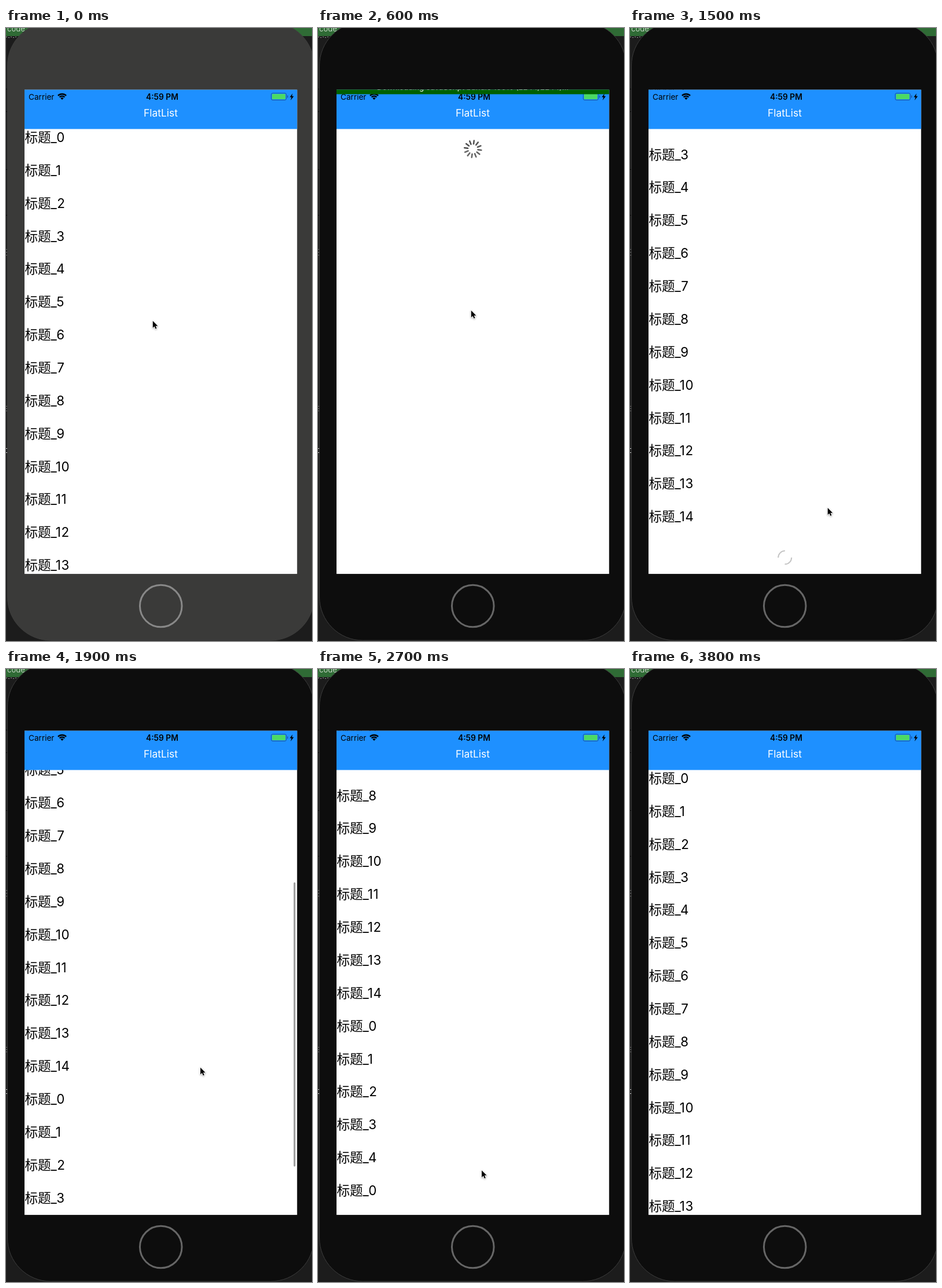
Animation of 529 by 1059 pixels, one loop 4000 ms. Source, as an HTML page with a canvas:

```html
<!DOCTYPE html>
<html lang="zh-CN">
<head>
<meta charset="utf-8">
<style>
html, body { margin: 0; width: 100%; height: 100%; overflow: hidden; background: #1c1c1c; }
canvas { display: block; }
</style>
</head>
<body>
<canvas id="stage" width="529" height="1059"></canvas>
<script>
const g = document.getElementById('stage').getContext('2d');
const FONT = 'Inter, "Noto Sans CJK SC", "Noto Sans CJK", sans-serif';
const LEFT = 32, WIDTH = 471.5, MID = LEFT + WIDTH / 2;
const TOP = 106.4, LIST = 174.5, BOTTOM = 943.3, VIEW = BOTTOM - LIST;
const ROW = 56.86, PAGE = 15, MORE = 5;
const LOOP = 4000, STEP = 100;

const clamp = u => Math.max(0, Math.min(1, u));
const mix = (a, b, u) => a + (b - a) * u;
const progress = (t, from, to) => clamp((t - from) / (to - from));
const ease = (t, from, to) => 1 - (1 - progress(t, from, to)) ** 2;
const rad = degrees => degrees * Math.PI / 180;

// Pointer stops: time and tip position
const STOPS = [
  [300, 253, 505], [600, 264, 487], [1000, 254, 680], [1500, 341, 828],
  [2200, 331, 582], [3000, 253, 1035], [3300, 325, 902], [3800, -20, -80]
];

function pointerAt(t) {
  const i = Math.max(1, STOPS.findIndex(s => s[0] >= t));
  const [a, b] = t > 3800 ? STOPS.slice(-2) : [STOPS[i - 1], STOPS[i]];
  const u = progress(t, a[0], b[0]);
  return [mix(a[1], b[1], u), mix(a[2], b[2], u)];
}

const rowsAt = t => PAGE + (t >= 1800) * MORE + (t >= 2500) * MORE;
const bottomOf = rows => (rows + 1) * ROW - VIEW;

// Two pulls to the end of the list, then a flick to the top with a small bounce
function offsetAt(t) {
  const first = bottomOf(PAGE), second = bottomOf(PAGE + MORE);
  const down = first * ease(t, 1200, 1400) + (second - first) * ease(t, 1800, 2100);
  const bounce = 7 * Math.sin(Math.PI * progress(t, 2800, 3200));
  return down - second * ease(t, 2700, 3000) - bounce;
}

function box(x, y, w, h, color) {
  g.fillStyle = color;
  g.fillRect(x, y, w, h);
}

function pill(x, y, w, h, r, fill, line) {
  g.beginPath();
  g.roundRect(x, y, w, h, r);
  if (fill) {
    g.fillStyle = fill;
    g.fill();
  }
  if (line) {
    g.strokeStyle = line;
    g.lineWidth = 1;
    g.stroke();
  }
}

function text(s, x, y, size, color, align = 'left', weight = 400) {
  g.font = `${weight} ${size}px ${FONT}`;
  g.fillStyle = color;
  g.textAlign = align;
  g.fillText(s, x, y);
}

function arc(x, y, r, mid, half, color, width) {
  g.beginPath();
  g.arc(x, y, r, rad(mid - half), rad(mid + half));
  g.strokeStyle = color;
  g.lineWidth = width;
  g.stroke();
}

function drawDesk() {
  box(0, 0, 529, 1059, '#1c1c1c');
  box(0, 0, 529, 14, '#2f6b35');
  text('code', 2, 6, 13, '#c4d4c4');
  for (let x = 0; x < 18; x += 4) box(x, 15 + x / 4 % 2, 2, 1, '#999');
  for (const y of [105, 144, 244, 323]) box(0, y, 4, 1, '#000');
  for (const y of [382, 387, 392, 653, 657, 661]) box(0, y, 3, 1, '#666');
  for (const y of [726, 733]) box(0, y, 3, 1, '#ccc');
}

function drawPhone(lit) {
  pill(2.5, -10, 530, 1068, 75, lit ? '#3a3a39' : '#0d0d0d', lit ? '#3f3f3e' : '#3c3c3c');
  arc(MID, 998.5, 36.3, 0, 180, lit ? '#888' : '#666', 3);
}

function drawSpokes(t) {
  for (let i = 0; i < 12; i++) {
    g.save();
    g.translate(MID, 209);
    g.rotate(rad(i * 30 + 8));
    const shade = 75 + (i - t / STEP + 120) % 12 * 3;
    pill(7.5, -1.3, 8.5, 2.6, 1.3, `rgb(${shade},${shade},${shade})`);
    g.restore();
  }
}

function drawLoader(y, t) {
  const turn = 45 + (t - 1500) * 0.15;
  for (const a of [turn, turn + 180]) arc(MID, y, 11.5, a, 46, '#c4c4c4', 2);
}

function drawScrollbar(rows, offset) {
  const track = VIEW - 6, size = track * VIEW / ((rows + 1) * ROW);
  const y = LIST + 3 + Math.max(0, offset) / bottomOf(rows) * (track - size);
  pill(497.3, y, 3, size + Math.min(0, offset), 1.5, '#999');
}

function drawList(t) {
  const rows = rowsAt(t), offset = offsetAt(t);
  for (let i = 0; i < rows; i++) {
    const y = LIST + i * ROW - offset + 22.5;
    text('标题', 32.5, y, 22.6, '#000');
    g.letterSpacing = '0.5px';
    text('_' + (i < PAGE ? i : i % MORE), 77.5, y, 22.4, '#000');
    g.letterSpacing = '0px';
  }
  drawLoader(LIST + (rows + 0.5) * ROW - offset, t);

  if (offset < -5) {
    box(252, 178, 9, 2, '#999');
    box(275, 178, 8, 2, '#ddd');
  }
  if (offset !== offsetAt(t - STEP)) drawScrollbar(rows, offset);
}

function drawHeader() {
  box(LEFT, TOP, WIDTH, LIST - TOP, '#1e90ff');
  text('Carrier', 39, 124, 13.6, '#000');
  text('4:59 PM', 270, 124, 13.8, '#000', 'center', 600);
  text('FlatList', 267.5, 153, 17.4, '#fff', 'center');

  for (const r of [1.9, 6.3, 10]) arc(97, 124, r, -90, 45, '#000', r < 2 ? 3.8 : 2.3);

  pill(458.5, 112.5, 26, 12, 2.5, null, '#1a569a');
  pill(460, 114, 23, 9, 1, '#4cd964');
  box(486, 116.5, 1.5, 4, '#1a569a');
  g.fillStyle = '#000';
  g.fill(new Path2D('M495.5 113l-5 6.5h3l-1.5 5.5 5.5-7.3h-3.2z'));
}

function drawBanner(y) {
  box(LEFT, y, WIDTH, 28, '#006000');
  text('Downloading JavaScript bundle 100% (2244/2244)...', 267.5, y + 20.5, 13.2, '#fff', 'center');
}

function drawPointer(x, y) {
  const arrow = new Path2D('M0 0v12l2.8-2.6 1.9 4.4 2-.8-1.9-4.3h3.8z');
  g.save();
  g.translate(x + 0.8, y + 1);
  g.strokeStyle = '#fff';
  g.lineWidth = 1.6;
  g.lineJoin = 'round';
  g.shadowColor = 'rgba(0,0,0,.35)';
  g.shadowBlur = 3;
  g.shadowOffsetY = 1;
  g.stroke(arrow);
  g.shadowColor = 'transparent';
  g.fillStyle = '#000';
  g.fill(arrow);
  g.restore();
}

function draw(t) {
  drawDesk();
  drawPhone(t < 100);
  g.save();
  g.beginPath();
  g.rect(LEFT, TOP, WIDTH, BOTTOM - TOP);
  g.clip();
  box(LEFT, TOP, WIDTH, BOTTOM - TOP, '#fff');
  if (t >= 500 && t < 900) drawSpokes(t);
  else drawList(t);
  drawHeader();
  if (t >= 400 && t < 700) drawBanner(TOP - 20 * progress(t, 500, 600));
  g.restore();
  drawPointer(...pointerAt(t));
}

const start = performance.now();
function tick() {
  const t = (performance.now() - start) % LOOP;
  draw(Math.floor(t / STEP) * STEP);
  requestAnimationFrame(tick);
}
tick();
</script>
</body>
</html>
```
